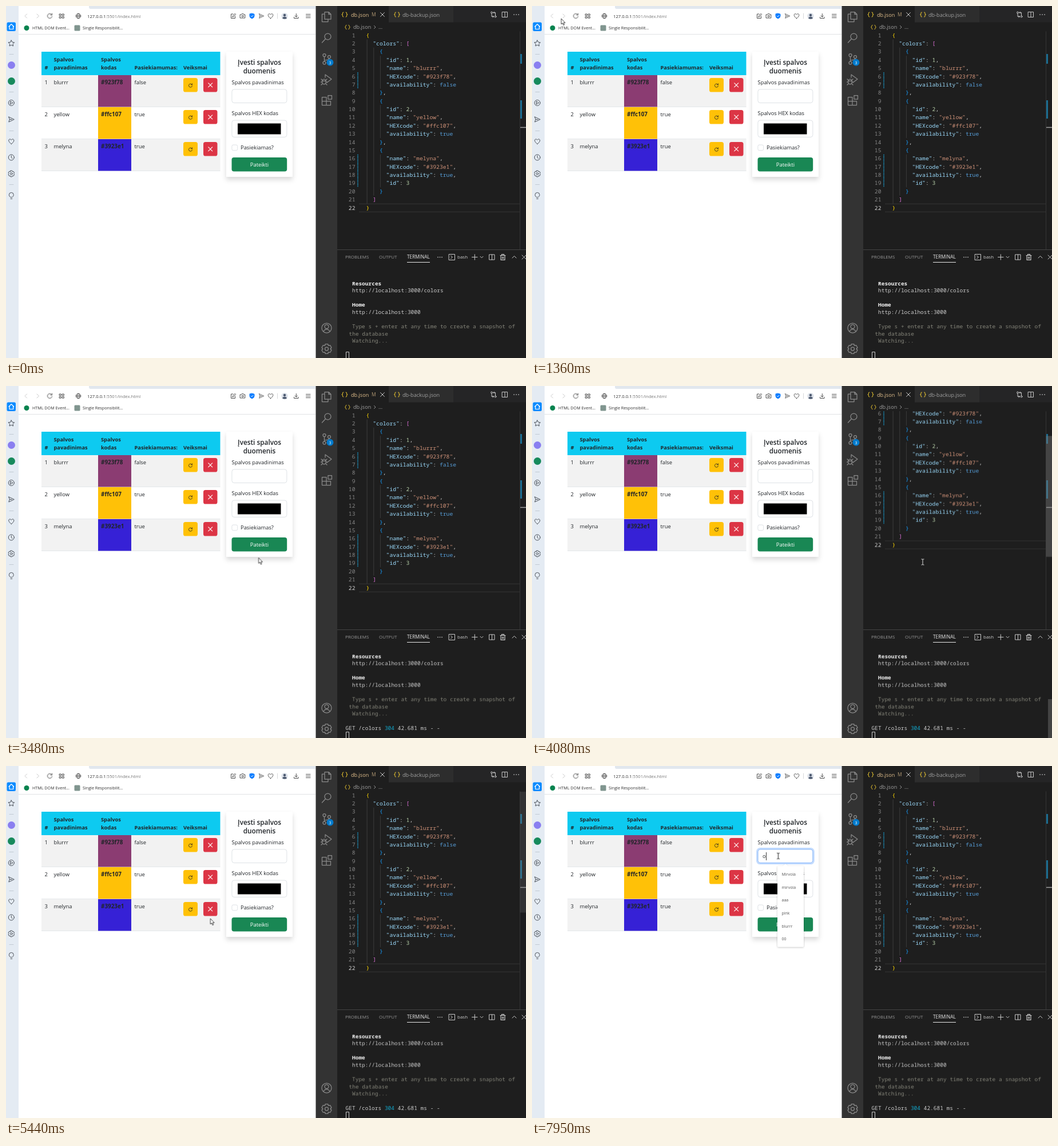
These frames come from a looping animation (909x616 px, 8 s). An HTML page:

```html
<!DOCTYPE html>
<html lang="lt">
<head>
<meta charset="utf-8">
<title>Color list</title>
<style>
html, body { margin: 0; width: 100%; height: 100%; overflow: hidden; background: #fff; }
svg { display: block; width: 100vw; height: 100vh; }
text { font-family: "Open Sans", "Noto Sans", sans-serif; fill: #212529; }
.page { font-size: 9.4px; }
.b { font-weight: 700; font-size: 9.25px; }
.mid { text-anchor: middle; }
.h { font-size: 11.8px; font-weight: 600; }
.url { font-size: 7.7px; fill: #333; }
.mark { font-size: 7.2px; fill: #333; }
.opt { font-size: 7px; fill: #555; }
.ui { font-size: 9.1px; fill: #a0a0a0; }
.tab { font-size: 8px; fill: #969696; }
.code text { font: 9.72px "Noto Sans Mono", "DejaVu Sans Mono", monospace; }
.code .num { fill: #858585; text-anchor: end; }
.code .now { fill: #d0d0d0; }
.term text { font: 9.5px "Noto Sans Mono", "DejaVu Sans Mono", monospace; fill: #ccc; }
.term .t { font-weight: 700; fill: #f2f2f2; }
.term .dim { fill: #85857a; }
.line { fill: none; stroke-linecap: round; stroke-linejoin: round; }

/* one loop is 8 s, so 1% is 80 ms */
.a { animation: 8s step-end infinite; }
#pointer { animation: move 8s linear infinite; }
#arrow { animation-name: arrow; }
#beam { animation-name: beam; }
#scroll { animation-name: scroll; }
#slider { animation: slider 8s linear infinite; }
#thumb { animation-name: thumb; }
#termSlider { animation: termSlider 8s linear infinite; }
#log { animation-name: log; }
#get { animation-name: get; }
#reload { animation-name: reload; }
#stop { animation-name: stop; }
#hover { animation-name: hover; }
#hoverGrid { animation-name: hoverGrid; }
#focus { animation: focus 8s linear infinite; }
#caret { animation-name: caret; }
#list { animation-name: list; }
#typed { animation-name: typed; }

@keyframes move {
  0%, 4.7% { transform: translate(913px, 602px); animation-timing-function: cubic-bezier(.35, .1, .4, 1); }
  14.3% { transform: translate(30px, 20px); }
  15.4% { transform: translate(34px, 21px); }
  17% { transform: translate(51px, 22px); }
  20.6% { transform: translate(74px, 29px); }
  24.7% { transform: translate(97px, 15px); }
  25.6% { transform: translate(82px, 17px); }
  28.2%, 40% { transform: translate(80px, 17px); animation-timing-function: ease-in-out; }
  46.5% { transform: translate(715px, 515px); }
  49.4% { transform: translate(692px, 432px); animation-timing-function: step-end; }
  50.2%, 51.8% { transform: translate(683px, 308px); }
  55.2% { transform: translate(679px, 294px); }
  56.1%, 59.3% { transform: translate(678px, 291px); animation-timing-function: ease-in-out; }
  65% { transform: translate(300px, 272px); }
  68% { transform: translate(357px, 267px); }
  69% { transform: translate(376px, 262px); animation-timing-function: ease-out; }
  77.4%, 100% { transform: translate(430.5px, 157.5px); }
}
@keyframes arrow { 0% { opacity: 0 } 7.6% { opacity: 1 } 43.8% { opacity: 0 } 61.3% { opacity: 1 } 75%, 100% { opacity: 0 } }
@keyframes beam {
  0% { opacity: 1; stroke: #ddd } 7.6% { opacity: 0 } 43.8% { opacity: 1; stroke: #ddd }
  61.3% { opacity: 0; stroke: #111 } 75%, 100% { opacity: 1; stroke: #111 }
}
@keyframes scroll { 0% { transform: none } 50.2% { transform: translateY(-75.4px) } 60.2%, 100% { transform: none } }
@keyframes thumb { 0% { transform: none } 50.2% { transform: translateY(42.4px) } 60.2%, 100% { transform: none } }
@keyframes slider { 0%, 50.1% { opacity: 0 } 50.2%, 62% { opacity: 1 } 76%, 100% { opacity: 0 } }
@keyframes termSlider { 0%, 45% { opacity: 0 } 46%, 58% { opacity: 1 } 67%, 100% { opacity: 0 } }
@keyframes log { 0% { transform: none } 36.8%, 100% { transform: translateY(-12.5px) } }
@keyframes get { 0% { opacity: 0 } 36.8%, 100% { opacity: 1 } }
@keyframes reload { 0% { opacity: 1 } 31.6% { opacity: 0 } 36.8%, 100% { opacity: 1 } }
@keyframes stop { 0% { opacity: 0 } 31.6% { opacity: 1 } 36.8%, 100% { opacity: 0 } }
@keyframes hover { 0% { opacity: 0 } 25.6% { opacity: 1 } 40.5%, 100% { opacity: 0 } }
@keyframes hoverGrid { 0% { opacity: 0 } 22.9% { opacity: 1 } 25.6%, 100% { opacity: 0 } }
@keyframes focus {
  0%, 31.5% { opacity: 0 } 32.5%, 36.8% { opacity: 1 } 37.6%, 78% { opacity: 0 } 80%, 100% { opacity: 1 }
}
@keyframes caret {
  0% { opacity: 0; transform: none } 31.6% { opacity: 1 } 36.8% { opacity: 0 }
  78.4% { opacity: 1 } 85% { opacity: 0 } 91.8% { opacity: 1 } 98.5% { opacity: 0; transform: none }
  99.3%, 100% { opacity: 1; transform: translateX(5.5px) }
}
@keyframes list { 0% { opacity: 0 } 78.4%, 100% { opacity: 1 } }
@keyframes typed { 0% { opacity: 0 } 99.3%, 100% { opacity: 1 } }
</style>
</head>
<body>
<svg viewBox="0 0 909 616" preserveAspectRatio="none">
  <defs>
    <filter id="shadow" x="-20%" y="-20%" width="140%" height="140%">
      <feDropShadow dx="0" dy="5" stdDeviation="4.5" flood-opacity=".15"/>
    </filter>
    <filter id="small" x="-20%" y="-20%" width="140%" height="140%">
      <feDropShadow dx="0" dy="1" stdDeviation="1.5" flood-opacity=".25"/>
    </filter>
    <clipPath id="editor"><path d="M579 44.5H909V426H579Z"/></clipPath>
    <path id="plane" d="M-4.5-4.5 5 0-4.5 4.5-3 0ZM-3 0H1"/>
    <path id="heart" d="M0 4.5C-7-.5-4.5-4.5-2-4 -.8-3.8 0-2.5 0-2.5S.8-3.8 2-4C4.5-4.5 7-.5 0 4.5Z"/>
    <path id="gear" d="M-1.4-5.3H1.4L1.9-3.6 3.9-3.9 5.3-1.4 4.1 0 5.3 1.4 3.9 3.9 1.9 3.6 1.4 5.3H-1.4L-1.9 3.6-3.9 3.9-5.3 1.4-4.1 0-5.3-1.4-3.9-3.9-1.9-3.6Z"/>
    <path id="cross" d="M-3.5-3.5 3.5 3.5M3.5-3.5-3.5 3.5"/>
    <path id="braces" d="M-2-4Q-3.7-4-3.5-2 -3.5 0-5 0-3.5 0-3.5 2-3.7 4-2 4M2-4Q3.7-4 3.5-2 3.5 0 5 0 3.5 0 3.5 2 3.7 4 2 4"/>
    <path id="split" d="M-4.5-4.5H4.5V4.5H-4.5ZM0-4.5V4.5"/>
    <path id="turn" d="M3.5-2.3A4.1 4.1 0 1 0 4.1.8M4-4.4V-1.8H1.4"/>
  </defs>

  <!-- browser frame -->
  <path d="M0 0H22V616H0Z" fill="#e4ebf3"/>
  <path d="M145 0H541V5H148Q145 5 145 2Z" fill="#e1e7ee"/>
  <path d="M22 49.5H541" stroke="#e0e2e4"/>
  <g class="line" stroke="#4a5058">
    <rect x="1.5" y="28.5" width="15.5" height="15.5" rx="2.5" fill="#0a8bff" stroke="none"/>
    <path d="M5 36 9.3 31.8 13.6 36M6 35.3V40.5H12.6V35.3" stroke="#fff" stroke-width="1.2"/>
    <path d="M9.3 60 11 63.3 14.6 63.8 12 66.4 12.6 70 9.3 68.3 6 70 6.6 66.4 4 63.8 7.6 63.3Z"/>
    <path d="M6 84.5H13M6 150.5H13M6 218.5H13M6 312.5H13" stroke="#c2cad3"/>
    <circle cx="9.5" cy="103.5" r="6.5" fill="#8a7ff0" stroke="none"/>
    <circle cx="9.5" cy="131.5" r="6.5" fill="#178a5c" stroke="none"/>
    <circle cx="9.3" cy="169.5" r="5"/><path d="M7.8 167 12 169.5 7.8 172Z"/>
    <use href="#plane" x="9.3" y="198.5"/><use href="#heart" x="9.3" y="237"/>
    <circle cx="9.3" cy="265" r="5"/><path d="M9.3 262V265L11.3 267"/>
    <use href="#gear" x="9.3" y="293.5"/><circle cx="9.3" cy="293.5" r="1.8"/>
    <path d="M7.5 334.5Q5.3 333 5.3 330.5A4 4 0 0 1 13.3 330.5Q13.3 333 11.1 334.5ZM8 337.3H10.8"/>
  </g>
  <rect id="hover" class="a" x="68" y="9" width="18" height="18" rx="2" fill="#dcdcdc"/>
  <rect id="hoverGrid" class="a" x="88" y="9" width="18" height="18" rx="2" fill="#e4e4e4"/>
  <g class="line" stroke="#444" stroke-width=".95">
    <path d="M36.5 14 33 17.5 36.5 21M54 14 57.5 17.5 54 21" stroke="#c8c8c8"/>
    <g transform="translate(76.5 17.5)">
      <g id="reload" class="a"><use href="#turn"/></g>
      <g id="stop" class="a"><use href="#cross"/></g>
    </g>
    <path d="M93.5 14H96.3V16.6H93.5ZM98.5 14H101.3V16.6H98.5ZM93.5 18.6H96.3V21.2H93.5ZM98.5 18.6H101.3V21.2H98.5Z"/>
    <circle cx="126.5" cy="17.5" r="4.2"/><ellipse cx="126.5" cy="17.5" rx="1.8" ry="4.2"/><path d="M122.5 17.5H130.5"/>
    <path d="M397 14H393.5V21.5H400.5V18M396 19 396.5 17 400.3 13.3 401.6 14.6 398 18.4Z"/>
    <path d="M409.5 15H411.5L412.3 13.7H415L415.8 15H417.8V21H409.5Z"/><circle cx="413.6" cy="17.8" r="1.5"/>
    <path d="M430 13 434 14.2V17.5Q434 20.5 430 22 426 20.5 426 17.5V14.2Z" fill="#0a7cff" stroke="#0a7cff"/>
    <path d="M428.2 17.5 429.6 19 432 16.2" stroke="#fff"/>
    <use href="#plane" transform="translate(446.5 17.5) scale(.85)"/><use href="#heart" transform="translate(462.5 17.5) scale(.95)"/>
    <path d="M474.5 13V22" stroke="#d5d7da"/>
    <circle cx="487" cy="17.5" r="5.5" fill="#dbe0e8" stroke="none"/>
    <path d="M482.8 21.2Q487 16.5 491.2 21.2 487 24.5 482.8 21.2Z" fill="#4d5a70" stroke="none"/>
    <circle cx="487" cy="16" r="2.2" fill="#4d5a70" stroke="none"/>
    <path d="M507.3 13.5V19M505 17 507.3 19.2 509.6 17M503.5 19.5V21.5H511V19.5M524.5 14.5H532M524.5 17.5H532M524.5 20.5H532"/>
  </g>
  <text class="url" x="142" y="20.6">127.0.0.1<tspan fill="#777">:5501/index.html</tspan></text>
  <circle cx="36" cy="38.5" r="4.5" fill="#08834f"/>
  <rect x="119.5" y="33.5" width="10" height="10" rx="1.5" fill="#80958f"/>
  <text class="mark" x="46" y="41">HTML DOM Event...</text>
  <text class="mark" x="134" y="41">Single Responsibilit...</text>

  <!-- table -->
  <path d="M62 80H374.5V121H62Z" fill="#0dcaf0"/>
  <g class="page" id="table">
    <text class="b" x="67.5" y="111.3">#</text>
    <text class="b" x="83.5" y="96.6">Spalvos</text><text class="b" x="83.5" y="111.3">pavadinimas</text>
    <text class="b" x="166" y="96.6">Spalvos</text><text class="b" x="166" y="111.3">kodas</text>
    <text class="b" x="224.5" y="111.3">Pasiekiamumas:</text><text class="b" x="310" y="111.3">Veiksmai</text>
  </g>

  <!-- form -->
  <rect x="385" y="80" width="116" height="219" fill="#fff" filter="url(#shadow)"/>
  <g class="page">
    <text class="h mid" x="443" y="102.8">Įvesti spalvos</text><text class="h mid" x="443" y="117.8">duomenis</text>
    <text x="394.5" y="136.8">Spalvos pavadinimas</text>
    <text x="394.5" y="191">Spalvos HEX kodas</text>
    <g fill="#fff" stroke="#dee2e6">
      <rect x="394.9" y="145.9" width="96" height="23.6" rx="4"/>
      <rect x="394.9" y="200" width="96" height="29.5" rx="4"/>
      <rect x="394.9" y="243" width="9.8" height="9.8" rx="2.5"/>
    </g>
    <path d="M405 205.5H480.5V224.5H405Z"/>
    <text x="410" y="251">Pasiekiamas?</text>
    <rect x="394.5" y="265" width="96.7" height="24.5" rx="4" fill="#198754"/>
    <text class="mid" x="443" y="280.7" style="fill:#fff">Pateikti</text>
    <g id="focus" fill="none">
      <rect x="393.3" y="144.3" width="99.2" height="26.8" rx="5.2" stroke="#c2dbfe" stroke-width="2.5"/>
      <rect x="394.9" y="145.9" width="96" height="23.6" rx="4" stroke="#86b7fe"/>
    </g>
    <text id="typed" class="a" x="403" y="161">o</text>
    <path id="caret" class="a" d="M403.5 151V165" stroke="#222" stroke-width=".9"/>
    <g id="list" class="a">
      <path d="M431 175H439L443 171.5 447 175H473Q475 175 475 177V314.5Q475 316.5 473 316.5H431Q429 316.5 429 314.5V177Q429 175 431 175Z" fill="#fff" filter="url(#small)"/>
    </g>
  </g>

  <!-- editor -->
  <path d="M541.5 0H579V616H541.5Z" fill="#333"/>
  <path d="M579 0H909V616H579Z" fill="#1e1e1e"/>
  <path d="M669 0H909V28.5H669Z" fill="#252526"/>
  <path d="M669 0H782V28.5H669Z" fill="#2d2d2d"/>
  <g class="line" stroke="#8a8a8a" stroke-width="1.25">
    <path d="M557 14V10.5H564L568 14.5V23H557ZM564 10.5V14.5H568M557 14H552.5V27.5H563V23"/>
    <circle cx="562.5" cy="53.5" r="5.5"/><path d="M558.5 57.5 552.5 64"/>
    <circle cx="556.5" cy="86" r="2.5"/><circle cx="556.5" cy="99.5" r="2.5"/><circle cx="565" cy="89" r="2.5"/>
    <path d="M556.5 88.5V97M565 91.5Q565 94.5 556.5 95"/>
    <path d="M558 125V120L569 128 561 134"/><ellipse cx="556" cy="132.5" rx="3.3" ry="4.3"/>
    <path d="M552.7 131H559.3M551 128 553.5 130M561 128 558.5 130M550.5 133H552.7M559.3 133H561.5M551 138 553.5 135.5M561 138 558.5 135.5"/>
    <path d="M552.5 159.5H560V173.5H552.5ZM552.5 166.5H567.5V173.5H560M563 156.5H569.5V163H563Z"/>
    <circle cx="560.5" cy="563.5" r="8.5"/><circle cx="560.5" cy="561" r="3.5"/><path d="M554.5 569.5Q560.5 561.5 566.5 569.5"/>
    <use href="#gear" transform="translate(560.5 600) scale(1.6)" stroke-width=".8"/><circle cx="560.5" cy="600" r="3"/>
  </g>
  <circle cx="566.5" cy="98.8" r="6" fill="#007acc"/>
  <text class="mid" x="566.5" y="101.5" style="font-size:7px;fill:#fff">3</text>
  <g class="line" stroke="#d9b82f" stroke-width="1.1">
    <use href="#braces" x="592" y="15"/><use href="#braces" x="683.5" y="15"/>
    <use href="#braces" transform="translate(597 37) scale(.9)"/>
  </g>
  <text class="ui" x="603" y="18.5" style="fill:#e2c08d">db.json</text>
  <text class="ui" x="639" y="18.3" style="font-size:8.5px;fill:#b39a74">M</text>
  <text class="ui" x="693" y="18.5">db-backup.json</text>
  <text class="ui" x="607" y="40.2">db.json</text><text class="ui" x="651" y="40.2">...</text>
  <g class="line" stroke="#c8c8c8">
    <use href="#cross" x="658" y="15"/>
    <path d="M643.5 34.5 646 37 643.5 39.5" stroke="#999"/>
    <circle cx="849" cy="11.5" r="1.5"/><circle cx="855.5" cy="18.5" r="1.5"/>
    <path d="M849 13V18.5H852.5M851 17 852.5 18.5 851 20M855.5 17V11.5H852M853.5 10 852 11.5 853.5 13"/>
    <use href="#split" x="872" y="15"/>
    <path d="M888 15H888.1M892 15H892.1M896 15H896.1" stroke-width="1.7"/>
  </g>
  <g clip-path="url(#editor)">
    <g id="scroll" class="a code"></g>
    <path d="M898.5 44V426" stroke="#343434"/>
    <path d="M899 84H902V101H899ZM899 165H902V197H899Z" fill="#1b6d91"/>
    <path d="M899 212.5H909" stroke="#a0a0a0" stroke-width="1.5"/>
    <g id="slider"><path id="thumb" class="a" d="M898.5 45H909V256.5H898.5Z" fill="#797979" fill-opacity=".42"/></g>
  </g>

  <!-- terminal panel -->
  <path d="M579 426.5H909" stroke="#444"/>
  <text class="tab" x="593" y="442.2">PROBLEMS</text><text class="tab" x="652" y="442.2">OUTPUT</text>
  <text class="tab" x="701" y="442.2" style="fill:#e7e7e7;font-size:8.25px">TERMINAL</text>
  <text class="tab" x="789" y="442.2" style="fill:#ccc">bash</text>
  <path d="M701 448.5H741" stroke="#e7e7e7"/>
  <g class="line" stroke="#c8c8c8">
    <path d="M755 439.5H755.1M758.5 439.5H758.6M762 439.5H762.1" stroke-width="1.7"/>
    <path d="M774.5 434.5H784.5V444.5H774.5ZM777.5 437 780.5 439.5 777.5 442M814.5 439.5H824M819.3 434.8V444.2M829 438.3 831.5 440.8 834 438.3M885 441 888.5 437.5 892 441"/>
    <use href="#split" x="849.5" y="439.5"/>
    <path d="M864 436.5H873M866.5 436.5V434.7H870.5V436.5M865 436.5V444.3H872V436.5M867.5 439V442M869.5 439V442" stroke-width="1.2"/>
    <use href="#cross" x="905.5" y="439.5"/>
  </g>
  <g class="term">
    <g id="log" class="a">
      <text class="t" x="605" y="488.7">Resources</text><text x="605" y="501.2">http://localhost:3000/colors</text>
      <text class="t" x="605" y="526.3">Home</text><text x="605" y="538.8">http://localhost:3000</text>
      <text class="dim" x="605" y="564.2">Type s + enter at any time to create a snapshot of</text>
      <text class="dim" x="599.5" y="576.8">the database</text><text class="dim" x="605" y="589.3">Watching...</text>
    </g>
    <text id="get" class="a" x="593.5" y="602">GET /colors <tspan fill="#11a8cd">304</tspan> 42.681 ms - -</text>
    <path d="M594.5 618V605.5H599.5V618" fill="none" stroke="#ccc"/>
    <path id="termSlider" d="M902 548H909V616H902Z" fill="#434343"/>
  </g>

  <g id="pointer">
    <path id="arrow" class="a" d="M0 0V9.8L2.2 7.9 3.9 11.6 5.5 10.9 3.9 7.3H6.9Z" fill="#fff" stroke="#111" stroke-width=".8"/>
    <path id="beam" class="a line" d="M-2-5H-.7L0-4.3.7-5H2M0-4.3V4.3M-2 5H-.7L0 4.3.7 5H2"/>
  </g>
</svg>
<script>
const add = (id, markup) => document.getElementById(id).insertAdjacentHTML('beforeend', markup);

// table rows
const rows = [
  ['blurrr', '#923f78', '#8b3c72', 'false'],
  ['yellow', '#ffc107', '#ffc107', 'true'],
  ['melyna', '#3923e1', '#3621d6', 'true']
];
rows.forEach(([name, hex, fill, free], i) => {
  const y = 121 + i * 56, base = y + 16.2;
  add('table', `
    <path d="M62 ${y}H374.5V${y + 56}H62Z" fill="${i % 2 ? '#fff' : '#f2f2f2'}"/>
    <path d="M62 ${y + 55.6}H374.5" stroke="#dee2e6" stroke-width=".8"/>
    <path d="M161 ${y}H219V${y + 55.6}H161Z" fill="${fill}"/>
    <text x="67.5" y="${base}">${i + 1}</text><text x="83.5" y="${base}">${name}</text>
    <text class="b" x="166" y="${base}" style="font-size:9.9px">${hex}</text>
    <text x="224.5" y="${base}">${free}</text>
    <rect x="310" y="${y + 5}" width="25" height="24.5" rx="3.6" fill="#ffc107"/>
    <rect x="345" y="${y + 5}" width="24.5" height="24.5" rx="3.6" fill="#dc3545"/>
    <use href="#turn" transform="translate(322.5 ${y + 18.2}) scale(.75)" class="line" stroke="#222" stroke-width="1.1"/>
    <use href="#cross" x="357.2" y="${y + 17.4}" class="line" stroke="#fff" stroke-width="1.1"/>`);
});

['Mirvola', 'mirvola', 'aaa', 'pink', 'blurrr', '00'].forEach((word, i) =>
  add('list', `<text class="opt" x="436.5" y="${191.8 + i * 22.7}">${word}</text>`));

// code: each line starts with its depth
const code = `0{
1"colors": [
2{
3"id": 1,
3"name": "blurrr",
3"HEXcode": "#923f78",
3"availability": false
2},
2{
3"id": 2,
3"name": "yellow",
3"HEXcode": "#ffc107",
3"availability": true
2},
2{
3"name": "melyna",
3"HEXcode": "#3923e1",
3"availability": true,
3"id": 3
2}
1]
0}`.split('\n');
const pitch = 14.38, indent = 11.66, codeX = 629.6;
const lineTop = n => 44 + (n - 1) * pitch;
const bracketFill = ['#ffd700', '#da70d6', '#179fff'];
const paint = (s, depth) => s.replace(/"[^"]*"(?=(:?))|\b(true|false)\b|\d+|[{}[\]]/g, (m, colon, bool) => {
  const fill = colon ? '#9cdcfe' : m[0] === '"' ? '#ce9178' : bool ? '#569cd6' : /\d/.test(m) ? '#b5cea8'
    : bracketFill[m === '[' ? 1 : depth];
  return `<tspan fill="${fill}">${m}</tspan>`;
});
const guide = (depth, from, to) =>
  `<path d="M${codeX + depth * indent + 1.5} ${lineTop(from)}V${lineTop(to + 1)}" stroke="#404040" stroke-width=".9"/>`;
const changed = (from, to) =>
  `<path d="M615 ${lineTop(from)}V${lineTop(to + 1)}" stroke="#1b81a8" stroke-width="2" stroke-dasharray="1.4 1"/>`;

add('scroll', `<path d="M617 ${lineTop(22) + .3}H898M617 ${lineTop(23)}H898" stroke="#303030" stroke-width="1.2"/>`
  + guide(0, 2, 21) + guide(1, 3, 20) + guide(2, 4, 7) + guide(2, 10, 13) + guide(2, 16, 19)
  + changed(6, 7) + changed(16, 19));
code.forEach((line, i) => {
  const depth = +line[0], y = lineTop(i + 1) + 10.6;
  add('scroll', `<text class="num ${i === 21 ? 'now' : ''}" x="610.5" y="${y}">${i + 1}</text>
    <text x="${codeX + depth * indent}" y="${y}" style="fill:#d4d4d4">${paint(line.slice(1), depth)}</text>`);
});
</script>
</body>
</html>
```
